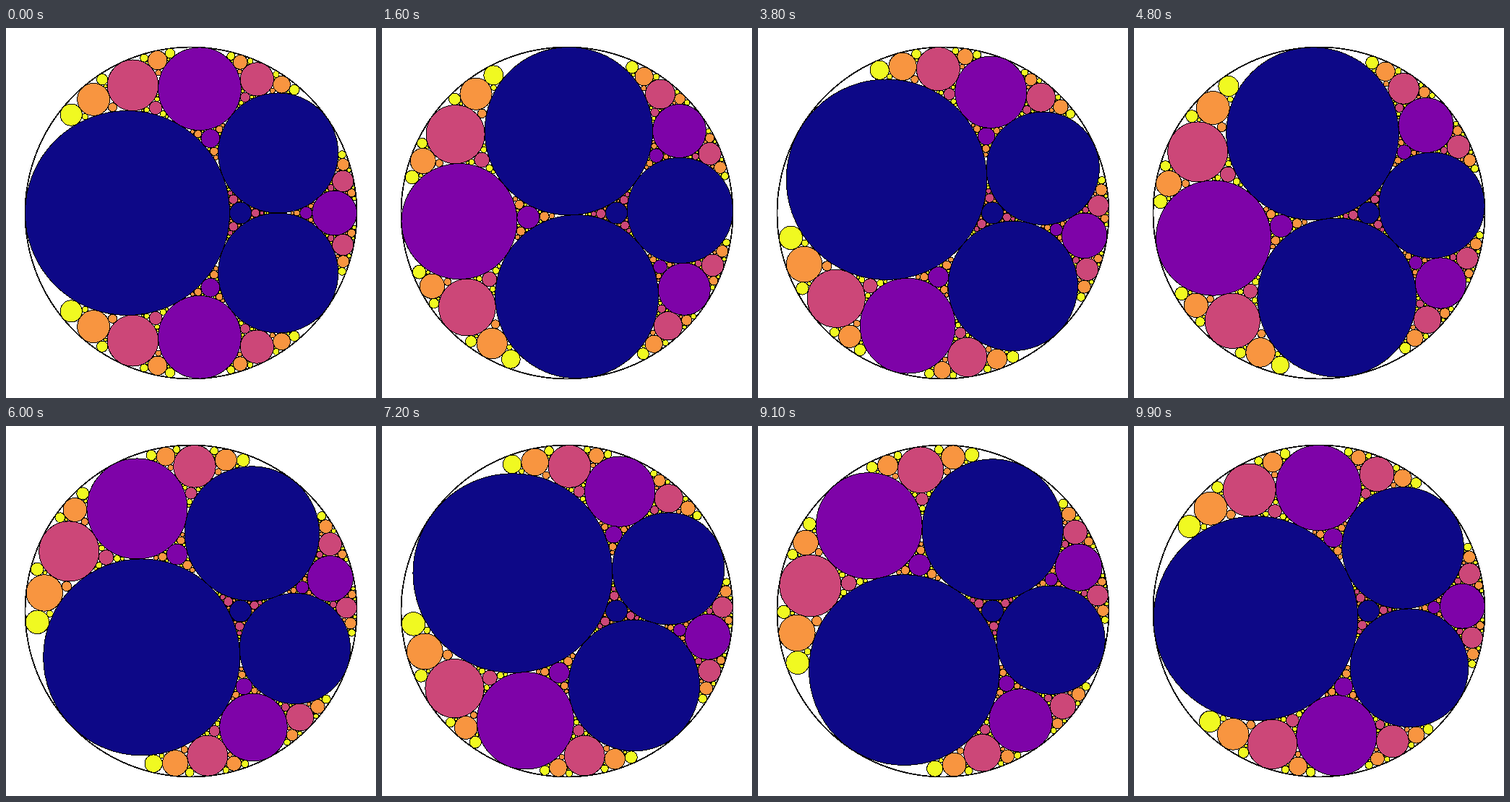
An HTML page for the animation above (10 s loop, 512 by 512 pixels).

```html
<!DOCTYPE html>
<html lang="en">
<head>
<meta charset="utf-8">
<title>Rotating Apollonian gasket</title>
<style>
  html, body { margin: 0; width: 100%; height: 100%; overflow: hidden; background: #fff; }
  svg { display: block; width: 512px; height: 512px; }
  circle { stroke: #000; stroke-width: 1; shape-rendering: crispEdges; }
  .outer { fill: #fff; stroke-width: 1.8; }
</style>
</head>
<body>
<svg id="stage" viewBox="0 0 512 512">
  <circle class="outer" cx="256" cy="256" r="229.5"/>
</svg>
<script>
const stage = document.getElementById('stage');
const MID = 256, R = 229.5;
const STEPS = 100, STEP_MS = 100;
const COLORS = ['#0d0887', '#7e03a8', '#cc4778', '#f89540', '#f0f921'];

// Three-circle Steiner chain in a concentric ring, moved off centre by a Möbius map.
const SHIFT = 0.3;
const S = Math.sin(Math.PI / 3);
const RHO = (1 - S) / (1 + S);
const map = x => (x + SHIFT) / (1 + SHIFT * x);
const K_RIGHT = 2 / (1 - map(RHO));
const K_LEFT = 2 / (1 + map(-RHO));

// A circle is { k: curvature, x: k * centre x, y: k * centre y }.
const OUTER = { k: -1, x: 0, y: 0 };

function chainCircle(theta) {
  const k = (K_RIGHT + K_LEFT) / 2 + (K_RIGHT - K_LEFT) / 2 * Math.cos(theta);
  const phi = 2 * Math.atan2((1 - SHIFT) * Math.sin(theta / 2),
                             (1 + SHIFT) * Math.cos(theta / 2));
  return { k, x: (k - 1) * Math.cos(phi), y: (k - 1) * Math.sin(phi) };
}

// The other circle tangent to the three members of quad besides quad[i].
function opposite(quad, i) {
  const swap = p => 2 * quad.reduce((sum, c) => sum + c[p], 0) - 3 * quad[i][p];
  return { k: swap('k'), x: swap('x'), y: swap('y') };
}

// Swap each member in turn; swaps of the outer circle's place stay on the level before.
function grow(quad, last, depth, out) {
  for (let i = 0; i < 4; i++) {
    const level = i === 0 ? depth - 1 : depth;
    if (i === last || level >= COLORS.length) continue;
    const circle = opposite(quad, i);
    out.push({ circle, level });
    grow(quad.with(i, circle), i, depth + 1, out);
  }
  return out;
}

function gasket(step) {
  const turn = 2 * Math.PI * step / STEPS;
  const chain = [0, 1, 2].map(i => chainCircle(Math.PI + turn + i * 2 * Math.PI / 3));
  const first = chain.map(circle => ({ circle, level: 0 }));
  return grow([OUTER, ...chain], -1, 1, first);
}

const dots = gasket(0).map(({ level }) => {
  const dot = document.createElementNS('http://www.w3.org/2000/svg', 'circle');
  dot.setAttribute('fill', COLORS[level]);
  return stage.appendChild(dot);
});

function render(step) {
  gasket(step).forEach(({ circle: { k, x, y } }, i) => {
    dots[i].setAttribute('cx', MID + R * x / k);
    dots[i].setAttribute('cy', MID + R * y / k);
    dots[i].setAttribute('r', R / k);
  });
}

const start = performance.now();
let shown = -1;
function tick() {
  const step = Math.floor((performance.now() - start) / STEP_MS) % STEPS;
  if (step !== shown) render(shown = step);
  requestAnimationFrame(tick);
}
tick();
</script>
</body>
</html>
```
